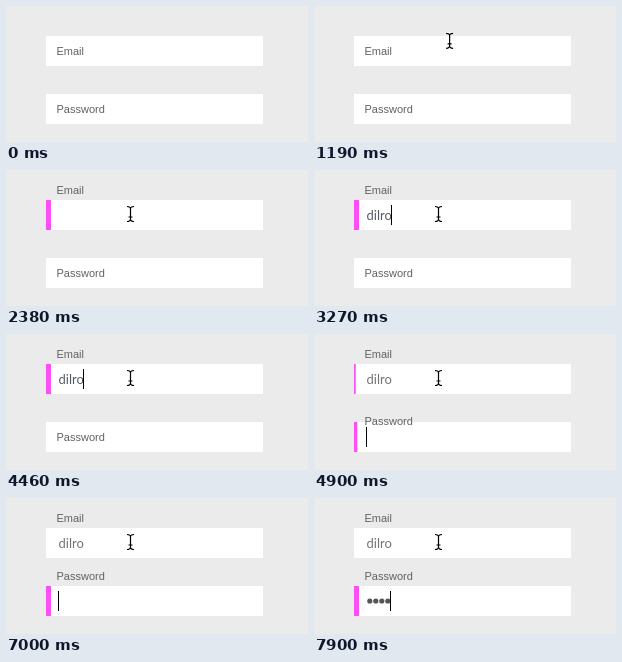
Write an HTML page with a canvas that moves like this. It is 302x136 px and loops after 8000 ms.

```html
<!DOCTYPE html>
<html lang="en">
<head>
<meta charset="utf-8">
<title>Floating labels</title>
<style>
  html, body { margin: 0; width: 100%; height: 100%; overflow: hidden; background: #ebebeb; }
  canvas { display: block; width: 302px; height: 136px; }
</style>
</head>
<body>
<canvas id="stage" width="302" height="136"></canvas>
<script>
const ctx = document.getElementById('stage').getContext('2d');
const LOOP = 8000, TICK = 148, FIELD_X = 40, FIELD_W = 217, FIELD_H = 30;
const LABEL_FONT = '11px "Liberation Sans", Arial, sans-serif';
const INPUT_FONT = '13px Lato, sans-serif';
const USER = 'dilro';
const AT = { cursor: 1050, click: 1630, typing: 2830, tab: 4760, secret: 7600 };

const clamp = v => Math.min(1, Math.max(0, v));
const easeOut = v => 1 - (1 - clamp(v)) ** 3;
const between = (t, a, b) => t >= a && t < b;

// Motion is held for one tick at a time, like a screen recording.
const ticks = (t, start) => Math.floor((t - start + 8) / TICK);
const focusAmount = (t, start) => easeOut(ticks(t, start) * 0.3);
const typed = (t, start, counts) =>
  t < start ? 0 : counts[Math.min(ticks(t, start), counts.length - 1)];

function text(str, x, y, font, color) {
  ctx.font = font;
  ctx.fillStyle = color;
  ctx.fillText(str, x, y);
}

function field(y, label, lift, bar) {
  ctx.fillStyle = '#fff';
  ctx.fillRect(FIELD_X, y, FIELD_W, FIELD_H);
  ctx.fillStyle = '#fb50f5';
  ctx.fillRect(FIELD_X, y, 5 * bar, FIELD_H);
  text(label, 50.5, y + 19 - 25 * lift, LABEL_FONT, '#626262');
}

function caret(x, y) {
  ctx.fillStyle = '#000';
  ctx.fillRect(Math.round(x), y + 5, 1, 20);
}

function arrow(x, y) {
  const points = [[0, 0], [0, 13], [3, 10.2], [5.2, 15.2], [7.2, 14.3], [5, 9.5], [9.3, 9.5]];
  ctx.beginPath();
  points.forEach(([px, py]) => ctx.lineTo(x + px, y + py));
  ctx.closePath();
  ctx.lineWidth = 1.5;
  ctx.strokeStyle = '#fff';
  ctx.stroke();
  ctx.fillStyle = '#000';
  ctx.fill();
}

function beam(x, y) {
  ctx.beginPath();
  for (const s of [-1, 1]) {
    ctx.moveTo(x - 3.5, y + 7.5 * s);
    ctx.quadraticCurveTo(x, y + 7.5 * s, x, y + 5 * s);
    ctx.quadraticCurveTo(x, y + 7.5 * s, x + 3.5, y + 7.5 * s);
  }
  ctx.moveTo(x, y - 6);
  ctx.lineTo(x, y + 6);
  ctx.moveTo(x - 2, y + 3);
  ctx.lineTo(x + 2, y + 3);
  for (const [width, color] of [[3, '#fff'], [1.2, '#000']]) {
    ctx.lineWidth = width;
    ctx.strokeStyle = color;
    ctx.stroke();
  }
}

function pointer(t) {
  if (t < AT.cursor) return;
  const p = easeOut(ticks(t, AT.cursor) / 3);
  const x = 162 - 37.5 * p, y = 13 + 31 * p;
  if (y < 30) arrow(x, y);
  else beam(x, y);
}

function clickRing(t) {
  const k = ticks(t, AT.click);
  if (k < 0 || k > 1) return;
  ctx.globalAlpha = 1 - 0.7 * k;
  ctx.lineWidth = 1.2;
  ctx.strokeStyle = '#000';
  ctx.beginPath();
  ctx.arc(125, 42.5, 10 + 7.5 * k, 0, Math.PI * 2);
  ctx.stroke();
  ctx.globalAlpha = 1;
}

function draw(t) {
  ctx.fillStyle = '#ebebeb';
  ctx.fillRect(0, 0, 302, 136);

  const email = focusAmount(t, AT.click);
  const password = focusAmount(t, AT.tab);
  field(30, 'Email', email, email * (1 - password));
  field(88, 'Password', password, password);

  const name = USER.slice(0, typed(t, AT.typing, [1, 2, 4, 5]));
  text(name, 52.5, 50, INPUT_FONT, t < AT.tab ? '#555a62' : '#737373');
  const nameWidth = ctx.measureText(name).width;

  const dots = typed(t, AT.secret, [1, 3, 4]);
  ctx.fillStyle = '#555';
  for (let i = 0; i < dots; i++) {
    ctx.beginPath();
    ctx.arc(55.8 + 6 * i, 103, 2.6, 0, Math.PI * 2);
    ctx.fill();
  }

  if (between(t, 1630, 2230) || between(t, 2830, 3870) || between(t, 4460, AT.tab))
    caret(52 + nameWidth, 30);
  if (between(t, AT.tab, 5350) || between(t, 5950, 6550) || t >= 7000)
    caret(52 + 6 * dots, 88);

  clickRing(t);
  pointer(t);
}

const begin = performance.now();
function frame() {
  draw((performance.now() - begin) % LOOP);
  requestAnimationFrame(frame);
}
frame();
</script>
</body>
</html>
```
